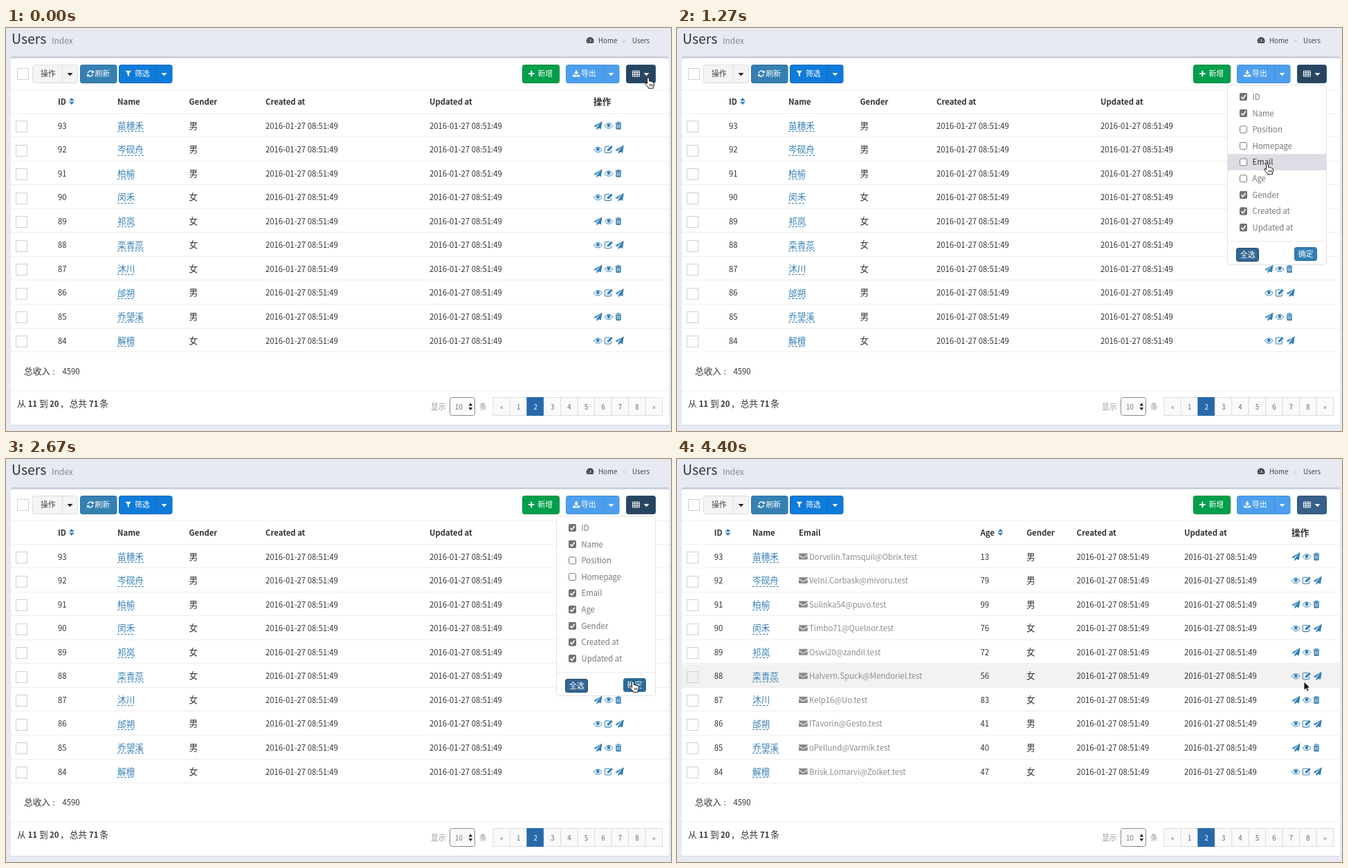
Animation, 961 px wide and 583 px high, one loop 4470 ms. Source, as an HTML page:

```html
<!DOCTYPE html>
<html lang="zh-CN">
<head>
<meta charset="utf-8">
<style>
html, body { margin: 0; width: 961px; height: 583px; overflow: hidden; background: #e7eaf2 }
svg { display: block; font-family: "Noto Sans CJK SC", "Noto Sans CJK", sans-serif }
</style>
</head>
<body>
<svg id="stage" width="961" height="583"></svg>
<script>
const LOOP = 4470, OPEN = 270, CLOSE = 3270, RELOAD = 3670;
const BLUE = '#337fb5', MID = 12.67, SMALL = 10.86;
const ROW = 34.56, TOP = 123.5, ITEM = 23.63;

// Latin glyphs of this family run large beside the Han ones, so they are set smaller.
const text = (x, y, s, { size = MID, fill = '#333', bold = 0, weight = bold ? 700 : 400, extra = '' } = {}) =>
  `<text x="${x}" y="${y}" font-size="${/[\u3000-\uffef]/.test(s) ? size : size * .895}" fill="${fill}" font-weight="${weight}" ${extra}>${s}</text>`;
const rect = (x, y, w, h, fill, stroke = 'none', r = 0, extra = '') =>
  `<rect x="${x}" y="${y}" width="${w}" height="${h}" rx="${r}" fill="${fill}" stroke="${stroke}" ${extra}/>`;
const path = (d, extra = '') => `<path d="${d}" ${extra}/>`;
const line = (d, w) => path(d, `fill="none" stroke="currentColor" stroke-width="${w}"`);
const group = (id, body) => `<g id="${id}">${body}</g>`;

const icons = {
  plane: path('M17.9.6L15.3 16.3 10.2 14.3 7.3 17.7 6.4 17.4V13.6L15 3 4.4 12.3.2 10.5Z'),
  eye: line('M.7 9.6Q4 4.2 9 4.2T17.3 9.6Q14 15 9 15T.7 9.6Z', 1.4) + '<circle cx="9" cy="8.9" r="3.5"/>',
  trash: path('M.5 3.2H13V4.6H.5ZM1.6 5H12V15.5Q12 17 10.5 17H3.1Q1.6 17 1.6 15.5Z') +
    line('M4.3 3.5L5 1.8H8.6L9.3 3.5', 1.3) + path('M4.3 7V14.5M6.8 7V14.5M9.3 7V14.5', 'stroke="#fff"'),
  edit: line('M14 10.5V14Q14 16 12 16H3Q1 16 1 14V5Q1 3 3 3H11', 1.5) + path('M6 9.5L14 1.5 17.2 4.7 9.2 12.5H6Z'),
  mail: path('M0 5V4Q0 2.6 1.6 2.6H16.4Q18 2.6 18 4V5L9 11ZM0 6.8L9 12.6 18 6.8V14Q18 15.4 16.4 15.4H1.6Q0 15.4 0 14Z'),
  refresh: line('M2 8A6.6 6.6 0 0 1 13.5 4.6M14 10A6.6 6.6 0 0 1 2.5 13.4', 2.3) + path('M16 1V7.5H9.5ZM0 17V10.5H6.5Z'),
  filter: path('M0 2H14L8.7 8.5V16.5L5.3 13.5V8.5Z'),
  plus: path('M5.5 2H8.7V7.4H14V10.6H8.7V16H5.5V10.6H0V7.4H5.5Z'),
  download: path('M6.5 1H10.5V6H14L8.5 12 3 6H6.5ZM0 11.5H5L8.5 14.5 12 11.5H17V16.5H0Z'),
  table: line('M.7 3H16.3V15.3H.7ZM.7 7H16.3M.7 11.2H16.3M5.9 3V15M11.1 3V15', 1.5),
  gauge: path('M2 15.5A8.8 8.8 0 1 1 16 15.5Z') + path('M9 13L10.5 6M3 11H5M13 11H15M5 6L6 7', 'stroke="#e7eaf2" stroke-width="1.7"'),
  sort: path('M0 7.8L5.5 2 11 7.8ZM0 10.2L5.5 16 11 10.2Z')
};
const icon = (name, x, y, color = BLUE, s = .707) =>
  `<g transform="translate(${x} ${y - 9 * s}) scale(${s})" color="${color}" fill="currentColor">${icons[name]}</g>`;
const caret = (x, color = '#fff') => path(`M${x} 65h8l-4 4.3z`, `fill="${color}"`);

function button(x, w, fill, edge, label, labelX, glyph, iconX, split) {
  const ink = glyph ? '#fff' : '#444';
  return rect(x + .5, 53.5, w - 1, 26, fill, edge, 2.7) +
    (split ? path(`M${split + .5} 54V79.5`, `stroke="${edge}"`) + caret(split + 7.5, glyph ? '#fff' : '#222') : '') +
    (glyph ? icon(glyph, iconX, 66, ink, .606) : '') +
    text(labelX, 70.3, label, { size: SMALL, fill: ink });
}

const people = [
  ['苗穗禾', '男', 13, 'Dorvelin.Tamsquil@Obrix.test'],
  ['岑砚舟', '男', 79, 'Velni.Corbask@mivoru.test'],
  ['柏榆', '男', 99, 'Sulinka54@puvo.test'],
  ['闵禾', '女', 76, 'Timbo71@Quelnor.test'],
  ['祁岚', '女', 72, 'Oswi20@zandil.test'],
  ['栾青蕊', '女', 56, 'Halvern.Spuck@Mendoriel.test'],
  ['沐川', '女', 83, 'Kelp16@Uo.test'],
  ['邰朔', '男', 41, 'lTavorin@Gesto.test'],
  ['乔望溪', '男', 40, 'oPellund@Varmik.test'],
  ['解檀', '女', 47, 'Brisk.Lomarvi@Zolket.test']
];

function table(id, cols) {
  let out = '';
  for (const [name, x] of Object.entries(cols)) out += text(x, 111, name, { bold: 1 });
  out += icon('sort', cols.ID + 16, 106);
  if (cols.Age) out += icon('sort', cols.Age + 25, 106);
  people.forEach(([name, gender, age, email], i) => {
    const mid = 141 + ROW * i, base = mid + 4.5;
    const cells = { ID: 93 - i, Gender: gender, Age: age, 'Created at': '2016-01-27 08:51:49', 'Updated at': '2016-01-27 08:51:49' };
    for (const key in cells) if (cols[key]) out += text(cols[key], base, String(cells[key]));
    out += text(cols.Name, base + .3, name, { fill: BLUE }) +
      path(`M${cols.Name} ${Math.round(mid + 8) + .5}h${name.length * MID}`, `stroke="${BLUE}" stroke-dasharray="3 2"`);
    if (cols.Email) out += icon('mail', cols.Email, mid, '#888') + text(cols.Email + 15, base, email, { fill: '#8c8c8c' });
    (i % 2 ? ['eye', 'edit', 'plane'] : ['plane', 'eye', 'trash'])
      .forEach((glyph, k) => out += icon(glyph, cols['操作'] + 15.6 * k, mid));
  });
  return group(id, out);
}

function page() {
  let out = text(8, 23, 'Users', { size: 21.7 }) + text(66, 23, 'Index', { size: 13.4, fill: '#888', weight: 300 }) +
    icon('gauge', 838.5, 18, '#444', .62) + text(856, 22, 'Home', { size: SMALL, fill: '#444' }) +
    text(891, 21.5, '&gt;', { size: 9.5, fill: '#bbb' }) + text(905, 22, 'Users', { size: SMALL, fill: '#444' }) +
    rect(7, 41, 951, 534, '#c8cddb', 'none', 3) + rect(7, 43.7, 951, 530.5, '#fff', 'none', 2) +
    rect(7, TOP + ROW * 5, 951, ROW, '#f2f2f2', 'none', 0, 'id="rowHover"');
  for (const y of [89.5, 525]) out += path(`M7 ${y}H958`, 'stroke="#eee"');
  for (let i = 0; i <= 10; i++) out += path(`M7 ${Math.round(TOP + ROW * i) - .5}H958`, 'stroke="#eee"');
  out += rect(16.5, 58.5, 16, 16, '#fff', '#d0d0d0');
  people.forEach((_, i) => out += rect(14.5, Math.round(134 + ROW * i) + .5, 16, 16, '#fff', '#d0d0d0', 0, i == 5 ? 'id="rowBox"' : ''));
  out += button(38, 66, '#f4f4f4', '#ddd', '操作', 50, '', 0, 81) +
    button(107, 53.5, '#3580b2', '#2f709f', '刷新', 128.5, 'refresh', 117) +
    button(163, 77.5, '#0f7bda', '#0c69bd', '筛选', 186, 'filter', 172.5, 217) +
    button(746, 54, '#009f4b', '#008b42', '新增', 768.5, 'plus', 755) +
    button(809, 77.5, '#4c9fed', '#4490d8', '导出', 831, 'download', 819, 863) +
    rect(896.5, 53.5, 42, 26, '#365f89', '#2f5377', 2.7, 'id="columns"') + icon('table', 905, 66, '#fff', .64) + caret(921.5);

  out += text(26, 501.3, '总收入') + text(67.5, 501, ':') + text(81.5, 501.3, '4590') +
    text(16, 548, '从') + text(31.7, 548, '11', { bold: 1 }) + text(48, 548, '到') + text(63, 548, '20', { bold: 1 }) +
    text(78, 548, '，') + text(91.7, 548, '总共') + text(120, 548, '71', { bold: 1 }) + text(135.3, 548, '条');
  const pale = { size: SMALL, fill: '#999' };
  out += text(614, 551.5, '显示', pale) + text(684, 551.5, '条', pale) +
    rect(641.5, 534.5, 36, 26, '#fafafa', '#8a8a8a', 3) + text(649, 551.7, '10', { size: SMALL, fill: '#777' }) +
    path('M668.5 546.5h5.6l-2.8-4.2zM668.5 549h5.6l-2.8 4.2z', 'fill="#222"');
  const cell = 24.45;
  [...'«12345678»'].forEach((s, i) => {
    const on = s == '2', x = 704 + cell * i;
    out += rect(x, 534.5, cell, 26, on ? '#2769aa' : '#fafafa', on ? '#2769aa' : '#ddd') +
      text(x + cell / 2, 551.7, s, { size: SMALL, fill: on ? '#fff' : '#666', extra: 'text-anchor="middle"' });
  });
  return out;
}

const fields = ['ID', 'Name', 'Position', 'Homepage', 'Email', 'Age', 'Gender', 'Created at', 'Updated at'];
const checkTimes = { Position: Infinity, Homepage: Infinity, Email: 1400, Age: 1960 };
function menu() {
  let out = rect(795.5, 82.5, 143, 260, '#fff', '#e2e2e4', 3) + rect(796, 0, 142, ITEM, '#dddde6', 'none', 0, 'id="itemHover"');
  fields.forEach((name, i) => {
    const y = 99.6 + ITEM * i;
    out += rect(813.5, y - 5, 10, 10, '#fff', '#777', 2) +
      group('tick' + i, rect(813, y - 5.5, 11, 11, '#737373', 'none', 2) +
        path(`M815.3 ${y + .2}l2.4 2.5 4-5.4`, 'fill="none" stroke="#fff" stroke-width="1.6"')) +
      text(831.5, y + 4.3, name, { fill: '#777', extra: `id="item${i}"` });
  });
  return out + path('M796 308.5H938', 'stroke="#e8e8e8"') +
    rect(808.5, 318.5, 32, 19, '#346591', '#22486b', 2.7) + text(814, 331.8, '全选', { size: SMALL, fill: '#fff' }) +
    rect(892.5, 317.5, 32, 19, BLUE, '#2f709f', 2.7, 'id="confirm"') + text(897.7, 331, '确定', { size: SMALL, fill: '#fff' });
}

const spinner = path('M5.2-5.2A7.3 7.3 0 0 0-5.2 5.2', 'id="spinner" fill="none" stroke="#3384cc" stroke-width="1.8"');
const outline = 'stroke-linejoin="round"';
const hand = group('hand', path('M-1.3 8.6L-1.6 1Q-1.5-.4 0-.4T1.4 1L1.7 5Q3.2 4 4.2 5.5 5.8 4.8 6.5 6.4 8.5 6 8.6 8.2 8.8 11 7.4 13.4V15.2H.4L.2 13.8Q-2.2 11.8-4.2 8.8-4.6 6.8-2.8 7.2Z', `fill="#fff" stroke="#111" ${outline}`) +
  path('M2.3 9V12.3M4.3 9V12.3M6.2 9V12.3', 'stroke="#111" stroke-width=".8"'));
const arrow = path('M0 0V12.6L2.9 9.9 4.9 14.3 7 13.4 5.1 9.1H9Z', `id="arrow" fill="#111" stroke="#fff" stroke-width=".9" ${outline}`);

stage.innerHTML = page() +
  table('before', { ID: 75, Name: 161, Gender: 264.5, 'Created at': 375, 'Updated at': 612, '操作': 849 }) +
  table('after', { ID: 53.7, Name: 109, Email: 176, Age: 438.5, Gender: 505, 'Created at': 577.5, 'Updated at': 733, '操作': 888 }) +
  group('menu', menu()) + spinner + hand + arrow;

const $ = id => document.getElementById(id);
const show = (id, on) => $(id).setAttribute('visibility', on ? 'visible' : 'hidden');
const fill = (id, color) => $(id).setAttribute('fill', color);
const move = (id, x, y, more = '') => $(id).setAttribute('transform', `translate(${x} ${y}) ${more}`);

// time, x, y of the pointer tip
const route = [[0, 928, 72], [330, 928, 72], [800, 871, 174], [1130, 853, 196], [1670, 853, 199], [1730, 853, 205],
  [1900, 853, 212], [2060, 855, 214], [2200, 889, 285], [2450, 905, 318], [2670, 906, 322], [LOOP, 906, 322]];
function pointer(t) {
  const i = Math.max(1, route.findIndex(p => p[0] >= t));
  const [t0, x0, y0] = route[i - 1], [t1, x1, y1] = route[i];
  const u = Math.max(0, (t - t0) / (t1 - t0)), e = u * u * (3 - 2 * u);
  return [x0 + (x1 - x0) * e, y0 + (y1 - y0) * e];
}

function draw(t) {
  const closed = t >= CLOSE, open = t >= OPEN && !closed;
  const [x, y] = pointer(t), hoverY = pointer(t - 60)[1];
  const hovered = Math.floor((hoverY - 87.6) / ITEM);
  const onItem = open && hovered >= 0 && hovered < fields.length;

  $('menu').style.display = open ? '' : 'none';
  show('itemHover', onItem);
  if (onItem) $('itemHover').setAttribute('y', 87.7 + ITEM * hovered);
  fields.forEach((name, i) => {
    fill('item' + i, onItem && i == hovered ? '#333' : '#777');
    $('tick' + i).style.display = t >= (checkTimes[name] || 0) ? '' : 'none';
  });
  fill('confirm', hoverY > 316 ? '#2a6a98' : BLUE);
  fill('columns', closed ? '#365f89' : '#284560');

  show('rowHover', closed);
  fill('rowBox', closed ? '#f0f0f0' : '#fff');
  show('before', t < RELOAD);
  show('after', t >= RELOAD);

  show('spinner', closed && t < 4100);
  $('spinner').setAttribute('opacity', Math.min(1, Math.max(0, (4100 - t) / 200)));
  move('spinner', 949.3, 10.8, `rotate(${270 + (t - 3600) * .9})`);

  show('hand', !closed);
  show('arrow', closed);
  move('hand', x, y);
  move('arrow', x, y);
}

function tick() {
  draw(performance.now() % LOOP);
  requestAnimationFrame(tick);
}
tick();
</script>
</body>
</html>
```
